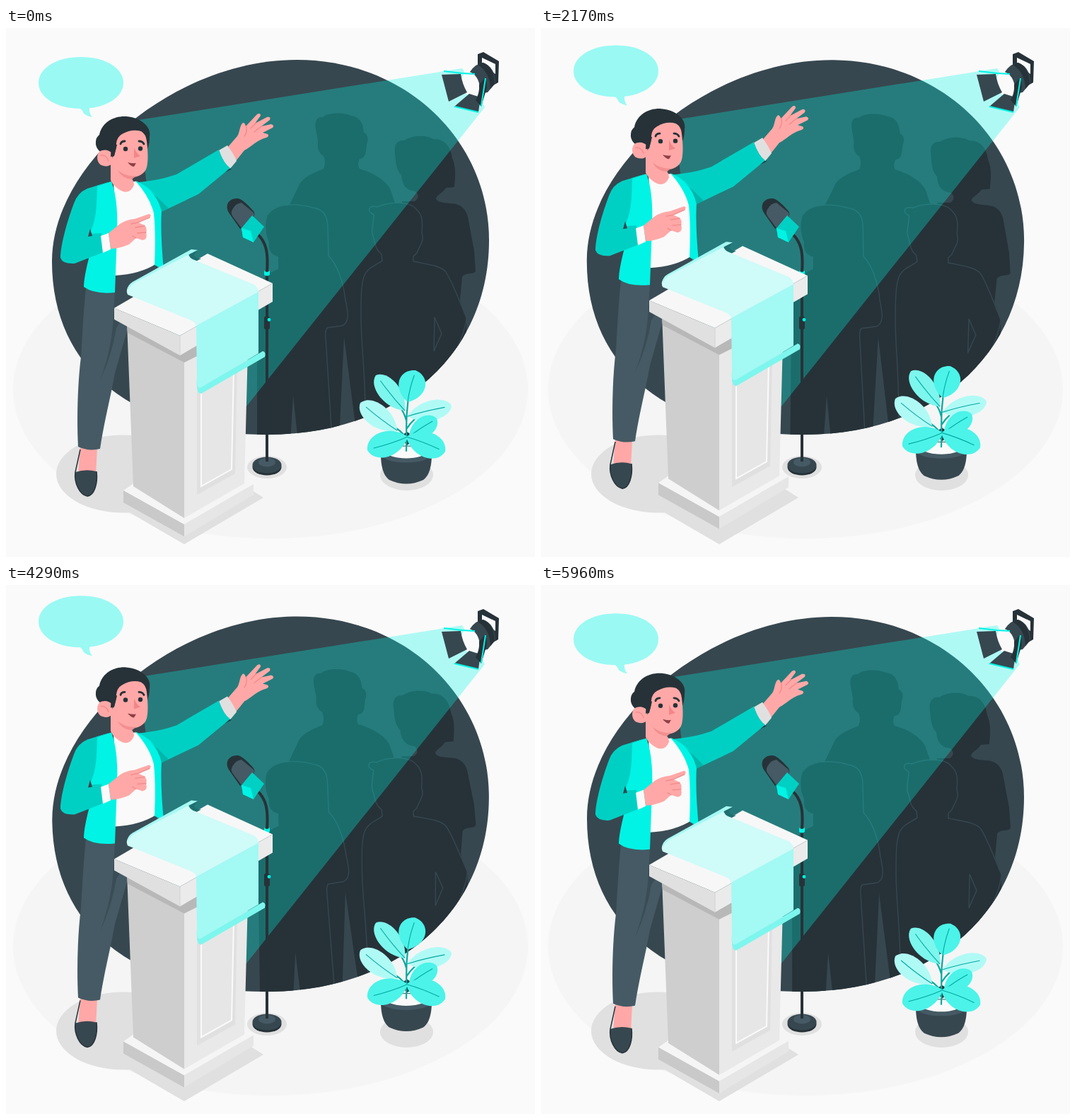
Animation of 748 by 748 pixels, one loop 6 s. Source, as an HTML page:

```html
<!DOCTYPE html>
<html lang="en">
<head>
<meta charset="utf-8">
<title>Speaker on stage</title>
<style>
html, body { margin: 0; width: 100%; height: 100%; overflow: hidden; background: #fafafa; }
svg { display: block; width: 100vw; height: 100vh; }
.night { fill: #263238; }
.slate { fill: #37474f; }
.steel { fill: #455a64; }
.skin { fill: #ffa8a7; }
.blush { fill: none; stroke: #f08a8b; stroke-width: 1.3; stroke-linecap: round; }
.bright { fill: #00f3e4; }
.deep { fill: #00d0c4; }
.shade { fill: #e0e0e0; }
.line { fill: none; stroke: #37474f; stroke-width: 1.4; }
.vein { fill: none; stroke: #00aaa0; stroke-width: 1.1; stroke-linecap: round; }
</style>
</head>
<body>
<svg viewBox="0 0 748 748">
  <defs>
    <path id="blob" d="M411 45C567 45 683 160 683 300C683 463 553 575 370 575C185 575 65 485 65 330C65 190 240 45 411 45Z"/>
    <clipPath id="inBlob"><use href="#blob"/></clipPath>
  </defs>
  <rect width="748" height="748" fill="#fafafa"/>
  <ellipse cx="374" cy="511" rx="364" ry="211" fill="#f5f5f5"/>
  <g class="shade">
    <ellipse cx="166" cy="630.500" rx="95" ry="55"/>
    <ellipse cx="566.500" cy="632" rx="37.500" ry="22"/>
    <ellipse cx="369" cy="621" rx="28" ry="16"/>
    <path d="M166 680L252 730L364 664L345 652L252 600Z"/>
  </g>

  <g id="crowd">
    <use href="#blob" class="slate"/>
    <g clip-path="url(#inBlob)">
      <g class="night">
        <path d="M438 143C436 133 439 125 448 126C456 119 478 119 488 124C501 126 505 135 506 148C512 150 513 158 510 164C509 173 510 184 500 185C498 189 497 195 500 199C520 205 535 214 543 227L555 262V420H385V275L403 246L416 219C424 208 440 203 449 199C452 192 451 186 449 181C441 176 440 168 441 160Z"/>
        <path d="M550 177C548 164 554 158 563 159C575 151 595 151 604 157C620 156 629 168 631 184C637 197 635 212 634 225L622 226C617 234 610 235 608 241C609 246 618 247 628 248C643 248 650 256 653 267L662 315L664 344C661 349 650 345 645 352L642 385L651 412V580H560V245L578 245C585 240 583 235 579 231C566 230 560 222 559 208C551 200 551 188 550 177Z"/>
        <path d="M370 264C380 248 408 247 434 254C450 256 455 268 455 282L456 322C468 334 477 358 480 385L490 390L478 436L471 585H413L406 520L402 585H355V378C357 350 375 345 395 337L397 324C383 325 370 321 372 303C366 289 366 276 370 264Z"/>
        <path d="M520 264C509 259 513 250 525 253C540 246 570 244 580 256C590 265 589 275 588 290C592 301 585 307 581 318L576 323V330C596 334 615 336 622 345C632 361 642 388 651 410C650 423 648 448 634 467L630 585H497L478 436L484 390L503 388C502 380 502 368 506 352C510 339 523 336 532 329L531 320C523 314 522 306 520 297C515 288 520 276 520 264Z"/>
      </g>
      <g class="line">
        <path d="M370 264C380 248 408 247 434 254C450 256 455 268 455 282L456 322C468 334 477 358 480 385C484 402 486 417 475 421L454 424Q451 428 452 438L461 580"/>
        <path d="M508 580C510 500 502 450 502 410C502 382 502 365 506 352C510 339 523 336 532 329L531 320C523 314 522 306 520 297C515 288 520 276 520 264C509 259 513 250 525 253C540 246 570 244 580 256C590 265 589 275 588 290C592 301 585 307 581 318L576 323V330C596 334 615 336 622 345C632 361 642 388 651 410C650 423 642 448 628 470"/>
        <path d="M606 409L616 432L605 457Z"/>
      </g>
    </g>
  </g>

  <path fill="#00f3e4" opacity=".3" d="M645 57L188 130L212 330L255 500L340 535L677 112Z"/>

  <g id="lamp">
    <path class="night" fill-rule="evenodd" d="M667 37L675 34L697 47L696 77L689 81L684 72L667 62ZM673 42V52L692 65V51Z"/>
    <path class="slate" d="M656 62Q664 50 675 49Q692 56 692 78L681 91L664 94Z"/>
    <path class="night" d="M674 49Q690 54 691 79L685 86Q684 62 667 52Z"/>
    <ellipse cx="657" cy="80" rx="12" ry="18.500" fill="#fafafa" transform="rotate(-18 657 80)"/>
    <path class="slate" d="M616 66L643 65Q645 79 652 91L626 104Z"/>
    <path class="slate" d="M655 93L671 98L668 119L634 111Z"/>
    <path class="night" d="M678 70L680 84L672 111L664 102Q670 92 669 80Z"/>
    <path d="M619 61L645 64L663 65M678 71L672 110M634 111L668 119" fill="none" stroke="#00f3e4" stroke-width="2"/>
  </g>

  <g id="mic">
    <ellipse class="night" cx="369" cy="621" rx="20.500" ry="11.500"/>
    <ellipse class="slate" cx="369" cy="618" rx="20.500" ry="11.500"/>
    <ellipse class="steel" cx="369" cy="614" rx="12" ry="6.500"/>
    <path d="M369 613V345C371 318 368 302 355 291" fill="none" stroke="#263238" stroke-width="4"/>
    <rect class="night" x="365" y="408" width="8" height="18" rx="2"/>
    <circle class="bright" cx="372" cy="412.500" r="2.400"/>
    <path class="bright" d="M365 343Q369 347 373 343V349Q369 352 365 349Z"/>
    <path class="night" d="M314 247Q319 240 328 241Q335 242 350 259Q354 265 347 270L331 284L317 264Q310 255 314 247Z"/>
    <path class="steel" d="M320 257Q324 248 333 247L350 261Q353 266 347 270L333 283L321 267Q317 262 320 257Z"/>
    <path class="deep" d="M333 283L348 265L365 281L350 303L335 296Z"/>
    <path class="bright" d="M333 283L346 287L350 303L335 296Z"/>
  </g>

  <g id="plant">
    <path class="slate" d="M530 602C530 623 535 634 542 639Q566 650 590 639C597 634 602 623 602 602Z"/>
    <ellipse class="steel" cx="566" cy="602.500" rx="36" ry="12"/>
    <ellipse cx="566" cy="600" rx="27" ry="8.500" fill="#fafafa"/>
    <path class="night" d="M561 575L567 571L575 576L574 585L567 590L562 584Z"/>
    <path class="vein" style="stroke-width:2.200" d="M566 598C567 570 564 545 571 515M566 555Q563 543 556 535M566 580Q558 568 545 562M567 566Q576 552 590 545"/>
    <g id="leaves"></g>
  </g>

  <g id="speaker">
    <!-- legs -->
    <path class="skin" d="M105 590L129 594L127 632H102Z"/>
    <path class="slate" d="M98 628Q113 623 128 627C130 643 125 661 115 662C104 659 96 643 98 628Z"/>
    <path d="M105 596L98 628C96 643 104 660 115 662C125 661 130 644 128 627" fill="none" stroke="#263238" stroke-width="1.500"/>
    <path class="steel" d="M113 368C109 405 108 435 106 465C101 505 100 555 102 592Q117 599 133 595C139 555 148 522 154 488L172 425L217 390L213 333L154 347Z"/>
    <path class="slate" d="M154 374L152 404Q151 450 133 498Q150 462 156 424L172 400L215 365L213 333L154 350Z" opacity=".72"/>

    <!-- raised arm -->
    <path class="skin" d="M314 168L327 153C331 147 330 138 335 134Q338 134 339 139L355 122Q360 119 360 124L352 135L369 126Q375 125 373 130L361 139L375 136Q380 138 377 141L363 148L370 150Q373 153 368 155C355 158 347 168 337 173L325 188Z"/>
    <path class="blush" d="M340 139Q341 149 337 153M354 134L346 142M361 139L351 147"/>
    <path class="night" d="M314 187L320 193L318 200L303 207Z"/>
    <path class="shade" d="M301 173L313 166Q322 178 326 188L317 199Q308 192 301 173Z"/>
    <path class="deep" d="M181 219C207 216 224 213 241 207L301 172Q306 190 317 198L272 235L228 256Q215 262 205 250Z"/>

    <!-- torso -->
    <path d="M152 218L184 217L211 246L213 333Q190 348 154 350L156 290Z" fill="#fafafa"/>
    <path class="bright" d="M183 216C199 222 222 241 220 258Q218 290 223 342L210 335Q212 290 209 262Q204 240 183 216Z"/>
    <path d="M203 229Q216 241 230 255L220 260Q216 241 203 229Z" fill="#00b5aa"/>
    <path class="bright" d="M128 223L149 217Q159 242 157 291L154 374Q125 377 110 366Q110 352 119 318L116 260Z"/>
    <path class="deep" d="M148 217L129 224C128 247 129 270 118 291L135 290L138 317L97 333Q80 334 77 325C77 309 85 277 96 248Q101 233 115 227Z"/>
    <path d="M119 284L116 295L122 294Z" fill="#37474f"/>

    <!-- pointing hand -->
    <path d="M134 294L145 290L148 313L137 318Z" fill="#fafafa"/>
    <path class="skin" d="M145 290L161 277Q170 271 182 270L202 263Q207 264 203 268L187 275L196 279Q200 284 198 289Q201 299 193 300L184 297L174 306Q160 312 148 312Z"/>
    <path class="blush" d="M203 268L187 275L177 277M196 280L183 282M198 289L186 290M184 297L179 294"/>

    <!-- head -->
    <path class="night" d="M148 181C135 179 126 171 127 161Q127 155 132 151C136 132 154 124 170 125C193 127 206 141 203 154Q203 166 199 173L160 178Z"/>
    <path class="skin" d="M148 187L153 180Q156 172 156 163Q157 154 164 150Q178 142 191 146Q198 150 199 160Q202 185 199 197C196 208 183 212 176 211Q181 216 181 222C176 234 167 234 158 227Q150 221 148 215Z"/>
    <path d="M158 201Q170 211 184 209L178 214Q164 213 158 201Z" fill="#f28f90"/>
    <path class="skin" d="M150 177Q144 171 136 173C127 175 127 190 135 194Q144 198 151 191Z"/>
    <path class="blush" d="M134 180Q142 179 145 188"/>
    <path class="night" d="M148 182L153 181L157 165L149 163Z"/>
    <path d="M181 169Q184 177 190 181L181 184Z" fill="#f28688"/>
    <circle class="night" cx="169" cy="171" r="3.200"/>
    <circle class="night" cx="190" cy="170.500" r="3.200"/>
    <path d="M162 164Q163 160 168 160M188 160Q193 160 195 164" fill="none" stroke="#263238" stroke-width="2.800" stroke-linecap="round"/>
    <path d="M172 190Q179 192 184 191L181 196Q177 196 172 190Z" fill="#8d3f45"/>

    <!-- lectern -->
    <path d="M166 654L180 644L252 680L337 638L350 645L252 702Z" fill="#f5f5f5"/>
    <path d="M166 654L252 702V719L166 671Z" fill="#c9c9c9"/>
    <path d="M252 702L350 645V660L252 719Z" fill="#e6e6e6"/>
    <path d="M171 416L252 445V693L180 648Z" fill="#cecece"/>
    <path d="M252 440L343 416L337 644L252 693Z" fill="#e9e9e9"/>
    <path d="M270 500L327 468L324 630L270 660Z" fill="#e0e0e0"/>
    <path d="M276 510L322 484L319 624L276 648Z" fill="#e6e6e6" stroke="#fafafa" stroke-width="2"/>
    <path d="M171 419L250 450L270 445V464L252 473L172 431Z" fill="#b8b8b8"/>
    <path d="M153 396L285 319L377 361L246 435Z" fill="#f7f7f7"/>
    <path d="M153 396L246 435V463L153 412Z" fill="#e0e0e0"/>
    <path d="M246 435L377 361V387L246 463Z" fill="#ebebeb"/>
    <path d="M246 435V463M246 435L377 361" stroke="#cfcfcf" stroke-width=".8"/>

    <!-- sheet -->
    <path d="M257 318L271 314L266 321Q268 326 276 326L263 333Z" fill="#1f6f70"/>
    <path d="M172 377Q168 369 177 361L258 318Q258 326 269 329L351 363Q357 367 357 374L269 421Q268 416 261 413Z" fill="#cffbf8"/>
    <path d="M172 372Q171 364 179 359L262 313L271 314L261 319L182 360Q175 364 172 372Z" fill="#a5f8f3"/>
    <path d="M269 421L357 373V460L272 511Q268 505 270 495Z" fill="#a3f9f4"/>
    <path d="M270 504Q271 510 276 508L363 457Q368 458 366 465L276 517Q270 517 270 504Z" fill="#7df6ee"/>
  </g>

  <g id="bubble" fill="#9af9f3">
    <path d="M106 41C141 41 166 57 166 77.500C166 98 141 114 106 114C71 114 46 98 46 77.500C46 57 71 41 106 41Z"/>
    <path d="M102 112Q108 115 110 121Q115 125 122 126Q117 121 118 111Z"/>
  </g>
</svg>
<script>
const LOOP = 6000;
const $ = id => document.getElementById(id);

// tip x, tip y, base x, base y, half width, colour
const leaves = [
  [523, 491, 564, 541, 15, '#7df6ee'],
  [579, 484, 568, 529, 19, '#4bf3e9'],
  [501, 530, 553, 569, 16, '#b0faf6'],
  [630, 534, 568, 549, 14, '#b0faf6'],
  [609, 552, 570, 578, 14, '#4bf3e9'],
  [511, 597, 568, 578, 18, '#4bf3e9'],
  [621, 599, 566, 578, 18, '#4bf3e9']
];

function leaf([tx, ty, bx, by, w, fill]) {
  const dx = bx - tx, dy = by - ty, len = Math.hypot(dx, dy);
  const at = (along, side) =>
    `${(tx + dx * along - dy / len * w * side).toFixed(1)} ${(ty + dy * along + dx / len * w * side).toFixed(1)}`;
  return `<path fill="${fill}" d="M${at(0, 0)}C${at(.08, 1.25)} ${at(.7, 1.4)} ${at(1, 0)}` +
    `C${at(.7, -1.4)} ${at(.08, -1.25)} ${at(0, 0)}Z"/>` +
    `<path class="vein" d="M${at(.16, 0)}Q${at(.6, .12)} ${at(1, 0)}"/>`;
}
$('leaves').innerHTML = leaves.map(leaf).join('');

const slide = v => `translate(0 ${v})`;
const turn = v => `rotate(${v} 374 310)`;

// each track is a list of [ms, value], joined by straight lines
const tracks = [
  ['bubble', slide, [[0, 0], [1500, -30], [3000, 0], [4500, -30], [6000, 0]]],
  ['speaker', slide, [[0, 0], [3000, -15], [6000, 0]]],
  ['plant', slide, [[0, 0], [1000, 0], [4000, -15], [6000, -5]]],
  ['crowd', turn, [[0, 0], [1500, 1], [4500, -1], [6000, 0]]]
].map(([id, pose, steps]) => ({ el: $(id), pose, steps }));

function valueAt(steps, t) {
  const i = steps.findIndex(s => s[0] > t);
  const [t0, a] = steps[i - 1], [t1, b] = steps[i];
  return a + (b - a) * (t - t0) / (t1 - t0);
}

let start = null;
function draw(now) {
  start ??= now;
  const t = Math.max(0, now - start) % LOOP;
  for (const { el, pose, steps } of tracks)
    el.setAttribute('transform', pose(valueAt(steps, t).toFixed(3)));
  requestAnimationFrame(draw);
}
requestAnimationFrame(draw);
</script>
</body>
</html>
```
